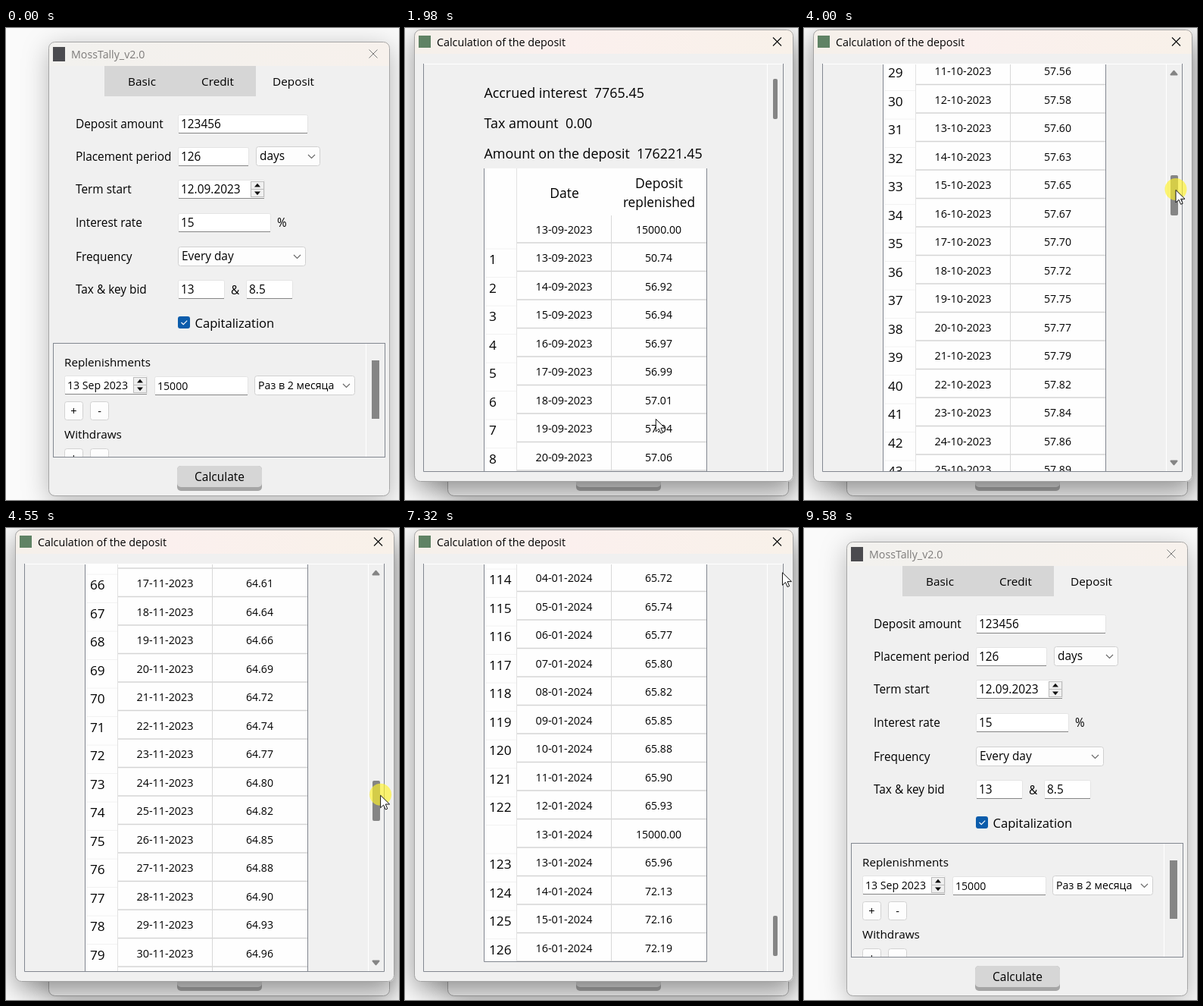
An HTML page for the animation above (9.64 s loop, 519x622 px).

```html
<!DOCTYPE html>
<html lang="en">
<head>
<meta charset="utf-8">
<title>Deposit calculator</title>
<style>
html, body { margin: 0; width: 100%; height: 100%; overflow: hidden; background: #fafafa; }
svg { display: block; width: 519px; height: 622px; }
text { font-family: "Open Sans", "Noto Sans", sans-serif; white-space: pre; }
#dialog { transform-origin: 263px 300px; }
.form-shadow { filter: drop-shadow(0 8px 17px rgba(0,0,0,.28)); }
.dialog-shadow { filter: drop-shadow(0 10px 17px rgba(0,0,0,.42)); }
</style>
</head>
<body>
<svg id="stage" viewBox="0 0 519 622"></svg>
<script>
const LOOP = 9640;
const MAX_SCROLL = 4512, THUMB_TOP = 67, THUMB_TRAVEL = 444, GRAB = 19;
const ROW_HEIGHT = 37.5, FIRST_ROW = 264.5;

// Markup helpers
const rect = (x, y, w, h, fill, more = '') =>
  `<rect x="${x}" y="${y}" width="${w}" height="${h}" fill="${fill}" ${more}/>`;
const line = (d, stroke, more = '') => `<path d="${d}" fill="none" stroke="${stroke}" ${more}/>`;
const text = (x, y, content, size = 15.4, more = '') =>
  `<text x="${x}" y="${y}" font-size="${size}" ${more}>${content}</text>`;
const centered = (x, y, content, size) => text(x, y, content, size, 'text-anchor="middle"');
const cross = (x, y, r, stroke, more = '') =>
  line(`M${x - r} ${y - r}l${2 * r} ${2 * r}m0 ${-2 * r}l${-2 * r} ${2 * r}`, stroke, more);
const triangle = (x, y, r, dir, fill, more = '') =>
  `<path d="M${x - r} ${y + dir * r / 2}h${2 * r}l${-r} ${-dir * r * 1.2}z" fill="${fill}" ${more}/>`;

const field = (x, y, w, value, size) =>
  rect(x + .5, y + .5, w - 1, 24, '#fff', 'rx="2" stroke="#e4e4e4"') +
  line(`M${x + 1} ${y + 24.5}h${w - 2}`, '#868686') + text(x + 4, y + 18, value, size);
const combo = (x, y, w, value, size) =>
  rect(x + .5, y + .5, w - 1, 25, '#fdfdfd', 'rx="3" stroke="#d0d0d0"') +
  text(x + 5, y + 18, value, size) +
  line(`M${x + w - 16} ${y + 11}l4.5 4.5 4.5-4.5`, '#666', 'stroke-width="1.1"');
const spinner = (x, y) =>
  [0, 10].map(d => rect(x + .5, y + d + .5, 17, 10, '#f0f0f0', 'stroke="#bbb"')).join('') +
  triangle(x + 9, y + 5.5, 4, 1, '#111') + triangle(x + 9, y + 15.5, 4, -1, '#111');
const smallButton = (x, y, sign) =>
  rect(x + .5, y + .5, 24, 24, '#fdfdfd', 'rx="3" stroke="#d2d2d2"') +
  centered(x + 12.5, y + 18, sign, 14.5);
const scrollArrow = (y, dir) =>
  triangle(488.5, y, 4, dir, '#858585', 'stroke="#858585" stroke-width="2" stroke-linejoin="round"');

function formMarkup() {
  const labels = ['Deposit amount', 'Placement period', 'Term start', 'Interest rate', 'Frequency', 'Tax &amp; key bid'];
  const baselines = [132, 175, 218, 262, 307, 350];
  return rect(57, 18, 450, 598, '#f0f0f0', 'rx="8" class="form-shadow"') +
    '<path d="M57 50V26a8 8 0 0 1 8-8H499a8 8 0 0 1 8 8V50z" fill="url(#formBar)"/>' +
    rect(56.5, 18.5, 450, 598, 'none', 'rx="8" stroke="#a6a6a6"') +
    rect(62, 25, 16, 19, '#4b4b4f') +
    text(86, 40, 'MossTally_v2.0', 14.2, 'fill="#7d7b7a"') +
    cross(485, 34, 5.5, '#777') +
    rect(130, 50, 200, 40, '#d6d6d6') +
    centered(179.5, 76, 'Basic', 15.3) + centered(279.5, 76, 'Credit', 15.3) + centered(379.5, 76, 'Deposit', 15.3) +
    labels.map((label, i) => text(92, baselines[i], label)).join('') +
    field(227, 114, 172, '123456') +
    field(227, 157, 94, '126') + combo(330, 156, 85, 'days') +
    field(227, 200, 115, '12.09.2023') + spinner(323, 202) +
    field(227, 244, 123, '15') + text(358, 262, '%') +
    combo(227, 288, 169, 'Every day') +
    field(227, 332, 62, '13') + text(297, 351, '&amp;') + field(317, 332, 62, '8.5') +
    rect(227, 380, 16, 16, '#0b5cab', 'rx="3"') +
    line('M231.5 388l2.7 2.7 5-5', '#fff', 'stroke-width="1.1"') +
    text(249.5, 395, 'Capitalization', 16.6) +
    '<g clip-path="url(#listClip)">' +
    text(77, 446, 'Replenishments', 15.2) +
    field(77, 458, 110, '13 Sep 2023', 14.1) + spinner(168, 460) +
    field(196, 459, 124, '15000', 14.1) + combo(328, 458, 133, 'Раз в 2 месяца', 14.2) +
    smallButton(77, 492, '+') + smallButton(111, 492, '-') +
    text(77, 541, 'Withdraws', 15.3) +
    smallButton(77, 554, '+') + smallButton(111, 554, '-') +
    line('M475.5 416V566', '#fff') + rect(483, 438, 10, 77, '#858585') + '</g>' +
    rect(62.5, 415.5, 438, 150, 'none', 'stroke="#828790"') +
    rect(226, 577, 112, 33, '#a5a5a5', 'rx="5" id="buttonEdge"') +
    rect(226, 577, 112, 28, '#d6d6d6', 'rx="5" id="buttonFace"') +
    centered(282, 597, 'Calculate', 15.5);
}

// Daily capitalisation with a top-up every second month
function tableMarkup() {
  let balance = 123456, index = 0, out = '';
  const addRow = (number, date, amount) => {
    const y = FIRST_ROW + ROW_HEIGHT * index++;
    out += text(111, y + 9, number, 17.2) + centered(210, y + 6, date, 14.4) +
      centered(335, y + 6, amount.toFixed(2), 14.1) +
      line(`M148 ${y + 18.5}H398`, '#d4d4d4', 'stroke-width="1.4"') +
      line(`M106 ${y + 26.5}H147`, '#f2f2f2');
  };
  for (let day = 1; day <= 126; day++) {
    const when = new Date(Date.UTC(2023, 8, 12 + day));
    const date = when.toISOString().slice(0, 10).split('-').reverse().join('-');
    const topUp = (day - 1) % 61 === 0 ? 15000 : 0;
    const interest = balance * .15 / (when.getUTCFullYear() === 2024 ? 366 : 365);
    if (topUp) addRow('', date, topUp);
    addRow(day, date, interest);
    balance += interest + topUp;
  }
  const top = 185, bottom = 5084;
  return text(104.5, 92, 'Accrued interest  7765.45', 17.9) +
    text(104.5, 132, 'Tax amount  0.00', 17.9) +
    text(104.5, 172, 'Amount on the deposit  176221.45', 17.9) +
    rect(105, top, 293, bottom - top, '#fefefe') +
    centered(210.5, 224, 'Date', 17.5) +
    centered(335.5, 211, 'Deposit', 17.5) + centered(335.5, 236, 'replenished', 17.3) + out +
    line(`M147.5 ${top}V${bottom}`, '#e2e2e2') + line(`M272.5 ${top + 62}V${bottom}`, '#d8d8d8') +
    line(`M104.5 ${top}V${bottom - .5}H398.5V${top}`, '#828790');
}

function dialogMarkup() {
  return rect(13, 2, 500, 596, '#f0f0f0', 'rx="8" class="dialog-shadow"') +
    '<path d="M13 34V10a8 8 0 0 1 8-8H505a8 8 0 0 1 8 8V34z" fill="url(#dialogBar)"/>' +
    '<path id="closeHover" d="M472 34V3H505a8 8 0 0 1 8 8V34z" fill="#c42b1c"/>' +
    rect(12.5, 2.5, 500, 595, 'none', 'rx="8" stroke="#a2a2a2"') +
    rect(18, 10, 16, 16, '#5f8264') +
    text(42, 24, 'Calculation of the deposit', 14.3) +
    cross(491.5, 18, 5.5, '#111', 'id="closeMark" stroke-width="1.2"') +
    '<g clip-path="url(#tableClip)"><g id="content">' + tableMarkup() + '</g></g>' +
    line('M24 47.5H499M478.5 48V584', '#fff') +
    line('M24.5 47V584.5H499.5V47', '#828790') +
    '<g id="arrows">' + scrollArrow(59.5, 1) + scrollArrow(572.5, -1) + '</g>' +
    rect(484, THUMB_TOP, 10, 53, '#858585', 'id="thumb" rx="2"');
}

const stage = document.getElementById('stage');
stage.innerHTML =
  `<defs>
    <linearGradient id="formBar"><stop stop-color="#f2f1ee"/><stop offset="1" stop-color="#f7f1ec"/></linearGradient>
    <linearGradient id="dialogBar"><stop stop-color="#f5f0ea"/><stop offset=".4" stop-color="#fbf0ee"/><stop offset="1" stop-color="#f8f1e9"/></linearGradient>
    <clipPath id="listClip"><rect x="63" y="416" width="437" height="149"/></clipPath>
    <clipPath id="tableClip"><rect x="25" y="48" width="453" height="536"/></clipPath>
  </defs>` +
  rect(0, 0, 519, 622, '#fafafa') + formMarkup() +
  `<g id="dialog">${dialogMarkup()}</g>
  <g id="pointer">
    <circle id="press" cy="-1" r="14.5" fill="#fff22a" fill-opacity=".65"/>
    <path d="M0 0V16.5L4 12.8 6.6 18.8 9.2 17.7 6.6 11.8H12z" fill="#fff" stroke="#111"/>
  </g>`;

const $ = id => document.getElementById(id);
const [dialog, content, thumb, arrows, pointer, press, closeHover, closeMark, buttonFace, buttonEdge] =
  ['dialog', 'content', 'thumb', 'arrows', 'pointer', 'press', 'closeHover', 'closeMark', 'buttonFace', 'buttonEdge'].map($);

// Pointer path: time, x, y
const path = [
  [0, 458, 630], [330, 456, 622], [700, 392, 606], [1000, 322, 592], [1250, 299.5, 588], [1850, 299.5, 588],
  [2150, 400, 350], [2530, 490, 86], [2640, 491, 86], [3090, 491.5, 97.02], [4000, 491, 213.33],
  [5110, 502, 493.68], [5400, 508, 531], [5650, 510, 540], [6420, 512, 500], [6640, 524, 375],
  [7040, 524, 150], [7320, 498.5, 59], [7600, 491, 18], [8060, 491, 18], [8600, 530, 150], [LOOP, 530, 150]
];
const presses = [[1590, 1720], [2600, 5560], [7950, 8040]];

// Monotone cubic through the path's points
function along(t, axis) {
  const slope = k => path[k] && path[k + 1]
    ? (path[k + 1][axis] - path[k][axis]) / (path[k + 1][0] - path[k][0]) : 0;
  const tangent = k => {
    const a = slope(k - 1), b = slope(k);
    return a * b > 0 ? 2 * a * b / (a + b) : 0;
  };
  const i = Math.max(0, path.findIndex(p => p[0] > t) - 1);
  const span = path[i + 1][0] - path[i][0], u = (t - path[i][0]) / span, v = 1 - u;
  return path[i][axis] * v * v * (1 + 2 * u) + path[i + 1][axis] * u * u * (3 - 2 * u) +
    span * u * v * (tangent(i) * v - tangent(i + 1) * u);
}

const clamp = (v, low = 0, high = 1) => Math.min(high, Math.max(low, v));

function draw(now) {
  const t = now % LOOP;
  const x = along(t, 1), y = along(t, 2);
  const inside = (left, top, right, bottom) => x >= left && x < right && y >= top && y < bottom;

  const pressed = presses.some(([from, to]) => t >= from && t < to);
  pointer.setAttribute('transform', `translate(${x} ${y})`);
  press.style.display = pressed ? '' : 'none';

  const opening = 1 - (1 - clamp((t - 1760) / 210)) ** 3;
  const closing = clamp((t - 8030) / 150);
  const shown = opening * (1 - closing);
  dialog.style.display = shown > 0 ? '' : 'none';
  dialog.style.opacity = shown;
  dialog.style.transform = `scale(${.9 + .1 * shown})`;

  const hover = shown === 0 && inside(226, 577, 338, 610);
  buttonFace.setAttribute('fill', hover ? '#c4dffe' : '#d6d6d6');
  buttonEdge.setAttribute('fill', hover ? '#98afc9' : '#a5a5a5');

  const dragged = t < 2640 ? 0 : t > 5500 ? 1 : clamp((y - THUMB_TOP - GRAB) / THUMB_TRAVEL);
  content.setAttribute('transform', `translate(0 ${-Math.round(dragged * MAX_SCROLL)})`);
  const wide = (t > 2600 && t < 5560) || inside(478, 48, 498, 584);
  arrows.style.display = wide ? '' : 'none';
  thumb.setAttribute('x', wide ? 484 : 486);
  thumb.setAttribute('width', wide ? 10 : 6);
  thumb.setAttribute('y', Math.round(THUMB_TOP + dragged * THUMB_TRAVEL));

  const overClose = inside(472, 3, 513, 34);
  closeHover.style.display = overClose ? '' : 'none';
  closeMark.setAttribute('stroke', overClose ? '#fff' : '#111');
}

function tick() {
  draw(performance.now());
  requestAnimationFrame(tick);
}
tick();
</script>
</body>
</html>
```
